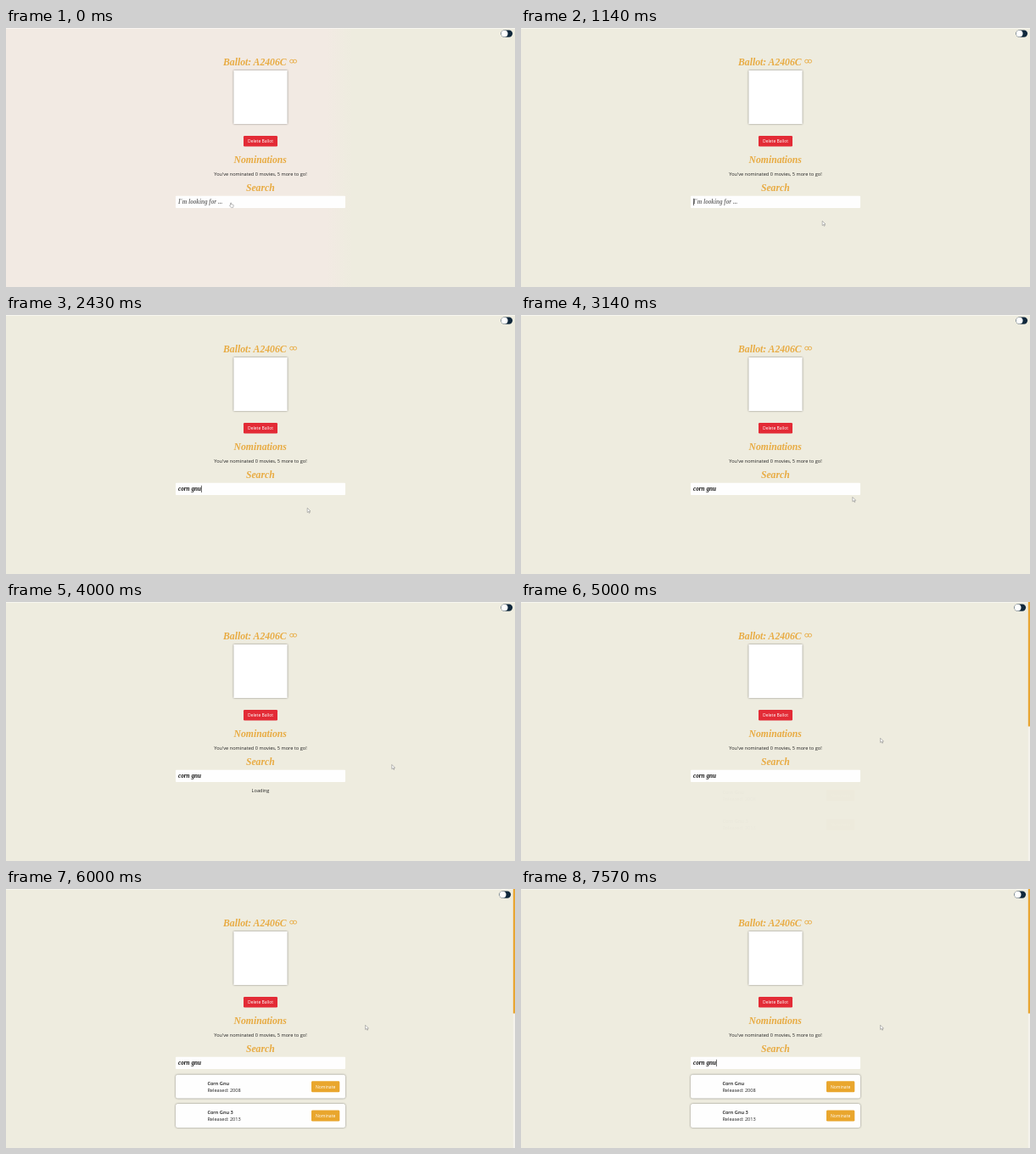
These frames come from a looping animation (600x305 px, 8 s). An HTML page:

```html
<!DOCTYPE html>
<html lang="en">
<head>
<meta charset="utf-8">
<title>Ballot</title>
<style>
  html, body { margin: 0; width: 100%; height: 100%; overflow: hidden; background: #eeecdf; }
  svg { display: block; width: 100%; height: 100%; }
  text { font: 5.62px "Open Sans", sans-serif; fill: #222; white-space: pre; }
  .heading { font: italic bold 11.7px "Liberation Serif", serif; fill: #e8ab42; }
  .field { font: italic bold 7.2px "Liberation Serif", serif; }
  .middle { text-anchor: middle; }
  .title { font-weight: 600; fill: #111; }
  .label { font-size: 5.05px; font-weight: 500; fill: #fff; text-anchor: middle; }
  .raised { filter: drop-shadow(0 .9px 1px rgba(0, 0, 0, .45)); }
</style>
</head>
<body>
<svg viewBox="0 0 600 305" preserveAspectRatio="none">
  <defs>
    <linearGradient id="blush">
      <stop offset=".63" stop-color="#f2eae3"/>
      <stop offset=".68" stop-color="#f2eae3" stop-opacity="0"/>
    </linearGradient>
  </defs>
  <rect width="600" height="305" fill="#eeecdf"/>
  <rect id="tint" width="600" height="305" fill="url(#blush)"/>
  <rect width="600" height=".8" fill="#fff" opacity=".6"/>

  <g id="toggle">
    <rect x="583.3" y="2.4" width="13.8" height="8.4" rx="4.2" fill="#10283c"/>
    <circle cx="587.6" cy="6.6" r="3.9" fill="#fff"/>
  </g>

  <text class="heading" x="256" y="44">Ballot: A2406C</text>
  <g fill="none" stroke="#e8ab42" stroke-width=".9">
    <rect x="334.6" y="37.3" width="4.2" height="3.8" rx="1.9"/>
    <rect x="338.4" y="37.3" width="4.2" height="3.8" rx="1.9"/>
  </g>
  <rect class="raised" x="268.4" y="50" width="63.2" height="63" fill="#fff"/>

  <rect x="280" y="127" width="40" height="12.6" rx="1.3" fill="#e32b36"/>
  <text class="label" x="300" y="135.2">Delete Ballot</text>

  <text class="heading middle" x="299.7" y="159.3">Nominations</text>
  <text class="middle" x="300" y="173.6">You've nominated 0 movies, 5 more to go!</text>
  <text class="heading middle" x="299.8" y="191.5">Search</text>

  <rect x="200" y="197.7" width="200" height="14.3" rx=".8" fill="#fefefe"/>
  <text class="field" id="query" x="203" y="207.2"></text>
  <rect id="caret" y="200.8" width=".6" height="8.2" fill="#111"/>
  <text class="middle" id="loading" x="300" y="223.8">Loading</text>

  <g id="results"></g>

  <g id="scrollbar">
    <rect x="597.8" width="2.2" height="305" fill="#f5f3ec"/>
    <rect x="597.8" width="2.2" height="146.5" fill="#e8a632"/>
  </g>

  <g id="pointer" stroke="#777" stroke-width=".5" stroke-linejoin="round" fill="#fff">
    <path id="arrow" d="M0 0V5.2L1.3 4.1L2.2 6L3 5.6L2.2 3.8H3.8Z"/>
    <path id="hand" d="M.6 3.2V.5Q1.1 -.2 1.6 .5V2.2L3.9 2.7Q4.4 3 4.3 3.7L3.7 5.8H1.3L-.6 3.6Q-.3 2.8 .6 3.2Z"/>
  </g>
</svg>
<script>
const LOOP = 8000, FPS = 7;
const QUERY = "corn gnu", TYPE_START = 1710, TYPE_END = 2425;
const LOADING_AT = 3425, LOADED_AT = 4995;
const BLINK = 510, FOCUS_AT = 850;
const movies = [["Corn Gnu", 2008], ["Corn Gnu 3", 2013]];

// Pointer stops: time, x, y
const path = [
  [0, 264, 205.5], [710, 264, 205.5], [1140, 355.2, 227.3],
  [2860, 355.2, 227.3], [3560, 454.8, 191.5],
  [4150, 454.8, 191.5], [4710, 423.6, 160.3]
];

const $ = id => document.getElementById(id);
const show = (id, on) => { $(id).style.display = on ? "" : "none"; };
const clamp = v => Math.min(1, Math.max(0, v));
const smooth = v => v * v * (3 - 2 * v);

$("results").innerHTML = movies.map(([title, year], i) => `
  <g transform="translate(0 ${i * 34.3})">
    <rect class="raised" x="200" y="218.8" width="200" height="27.8" rx="2.5" fill="#fefefe"/>
    <text class="title" x="237.4" y="230.8">${title}</text>
    <text x="237.4" y="238.7">Released: ${year}</text>
    <rect x="360" y="226.3" width="33.3" height="13" rx="1.4" fill="#e9a62d"/>
    <text class="label" x="376.6" y="234.7">Nominate</text>
  </g>`).join("");

function pointerAt(t) {
  const next = path.findIndex(stop => stop[0] > t);
  if (next < 0) return path[path.length - 1].slice(1);
  const [t0, x0, y0] = path[next - 1], [t1, x1, y1] = path[next];
  const k = smooth((t - t0) / (t1 - t0));
  return [x0 + (x1 - x0) * k, y0 + (y1 - y0) * k];
}

function caretVisible(t) {
  if (t < FOCUS_AT) return false;
  if (t >= TYPE_START && t < TYPE_END) return true;
  const since = t < TYPE_START ? FOCUS_AT : TYPE_END;
  return Math.floor((t - since) / BLINK) % 2 === 0;
}

function draw(t) {
  $("tint").style.opacity = 1 - clamp((t - 700) / 440);

  const progress = clamp((t - TYPE_START) / (TYPE_END - TYPE_START));
  const typed = t < TYPE_START ? 0 : 1 + Math.floor(progress * (QUERY.length - 1));
  const query = $("query");
  query.textContent = typed ? QUERY.slice(0, typed) : "I'm looking for ...";
  query.style.fill = typed ? "#111" : "#757575";
  $("caret").setAttribute("x", 203 + (typed ? query.getComputedTextLength() : 0));
  show("caret", caretVisible(t));

  const loaded = t >= LOADED_AT;
  show("loading", t >= LOADING_AT && !loaded);
  show("results", loaded);
  show("scrollbar", loaded);
  $("toggle").setAttribute("transform", `translate(${loaded ? -2 : 0} 0)`);
  const enter = 1 - (1 - clamp((t - LOADED_AT) / 750)) ** 2;
  $("results").setAttribute("opacity", enter);
  $("results").setAttribute("transform", `translate(0 ${-5 * (1 - enter)})`);

  $("pointer").setAttribute("transform", `translate(${pointerAt(t)})`);
  show("hand", t < FOCUS_AT);
  show("arrow", t >= FOCUS_AT);
}

// The picture advances at a fixed low frame rate.
const start = performance.now();
function frame() {
  const t = (performance.now() - start) % LOOP;
  draw(Math.floor((t + 5) * FPS / 1000) * 1000 / FPS % LOOP);
  requestAnimationFrame(frame);
}
frame();
</script>
</body>
</html>
```
